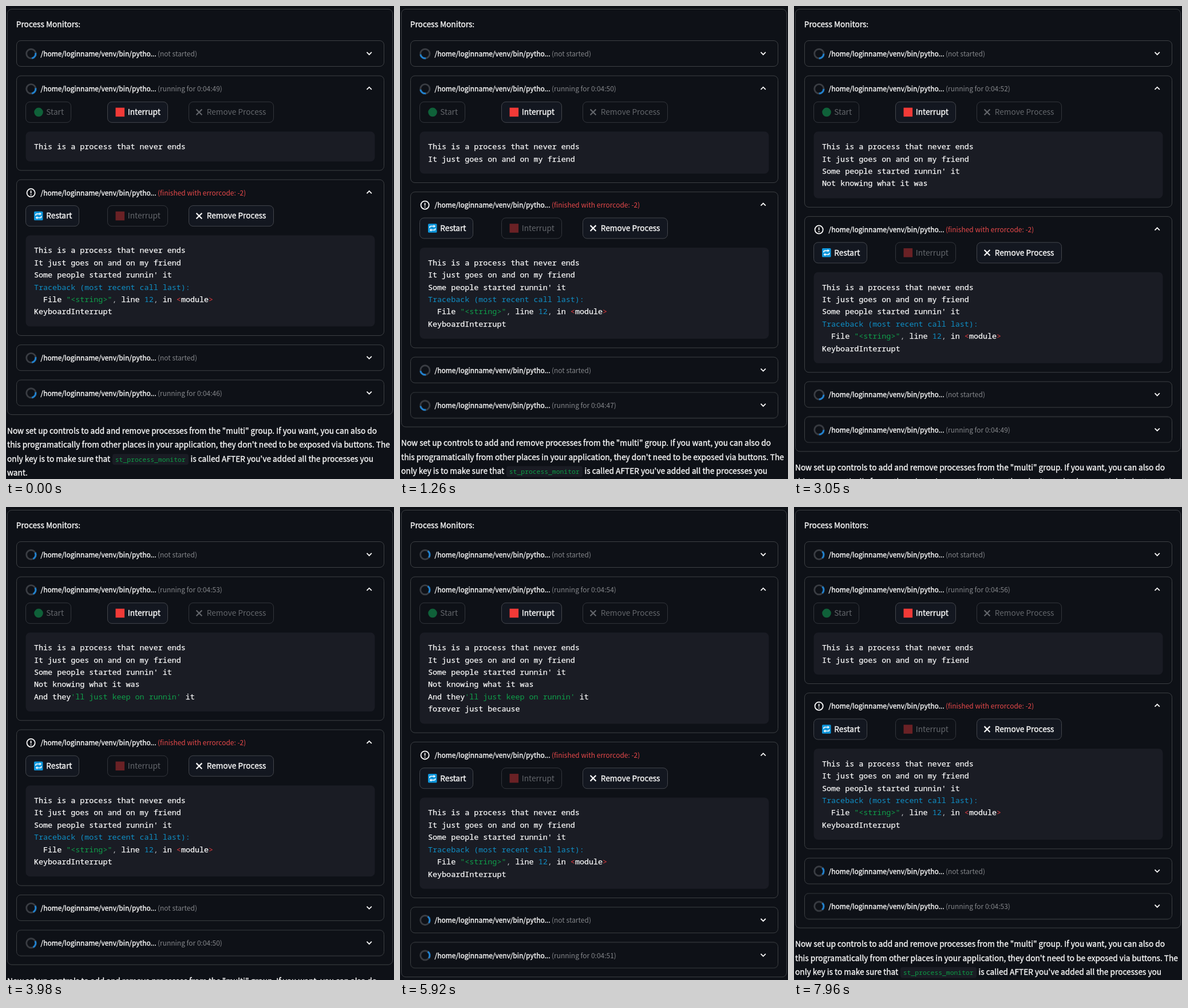
Write an HTML page that moves like this. It is 678 px wide and 826 px high and loops after 8 s.

```html
<!DOCTYPE html>
<html lang="en">
<head>
<meta charset="utf-8">
<title>Process Monitors</title>
<style>
  html, body { margin: 0; width: 100%; height: 100%; overflow: hidden; background: #0e1117; }
  svg { display: block; }
  text {
    font-family: "Noto Sans CJK JP", "Noto Sans CJK SC", "Open Sans", sans-serif;
    font-size: 13.68px; fill: #fafafa; stroke: #fafafa; stroke-width: .35px; white-space: pre;
  }
  .label { font-size: 11.97px; }
  .note { fill: #84868a; stroke: none; }
  .failed { fill: #e8494a; stroke: none; }
  .off { fill: #63666b; stroke: none; }
  .code, .tag { font-family: "Noto Sans Mono", "DejaVu Sans Mono", monospace; }
  .code { font-size: 13.38px; stroke-width: .25px; }
  .tag { font-size: 11.39px; fill: #0c9f46; stroke: none; }
  .blue { fill: #0f8fc6; stroke: none; }
  .green { fill: #0fa04a; stroke: none; }
  .red { fill: #e5393e; stroke: none; }
  .dim { fill: #b4b6b9; stroke: none; }
  .frame { fill: none; stroke: #3d4044; }
  .block { fill: #1a1c24; }
  .line { fill: none; stroke: #fafafa; stroke-width: 1.8; }
  .ring, .arc { fill: none; stroke-width: 2.9; }
  .ring { stroke: #3a3d43; }
  .arc { stroke: #1f86d8; stroke-dasharray: 1 3; animation: spin 8s linear infinite; }
  /* 8 s at one turn per 1.007 s */
  @keyframes spin { from { transform: rotate(-10deg); } to { transform: rotate(2850deg); } }
</style>
</head>
<body>
<svg id="stage" width="678" height="826" viewBox="0 0 678 826"></svg>
<script>
const LINE = 21.42, LOOP = 8000, FIRST_TICK = 955, TICK = 1007;
const stage = document.getElementById('stage');

const at = (y, body) => `<g transform="translate(0 ${y})">${body}</g>`;
const moving = (y, body) => `<g data-y="${y}">${body}</g>`;
const text = (x, y, body, cls = '') => `<text x="${x}" y="${y}" class="${cls}">${body}</text>`;
const span = (cls, body) => `<tspan class="${cls}">${body}</tspan>`;
const box = (x, y, w, h, cls, extra = '') =>
  `<rect x="${x}" y="${y}" width="${w}" height="${h}" rx="7.5" class="${cls}" ${extra}/>`;

const spinner = `<g transform="translate(43.8 22.8)"><circle r="8.1" class="ring"/>
  <circle r="8.1" class="arc" pathLength="4"/></g>`;
const alertIcon = `<circle cx="43.6" cy="23" r="7.1" class="line"/>
  <path class="line" d="M43.6 19v5M43.6 25.5v1.9"/>`;

function heading(note, { open = false, failed = false, id = '' } = {}) {
  const chevron = open ? 'M630.5 24l4.2-4.2 4.2 4.2' : 'M630.5 20.2l4.2 4.2 4.2-4.2';
  return (failed ? alertIcon : spinner)
    + text(60.5, 27.5, '/home/loginname/venv/bin/pytho...', 'label')
    + `<text x="265" y="27.5" class="label ${failed ? 'failed' : 'note'}" id="${id}">${note}</text>`
    + `<path class="line" d="${chevron}"/>`;
}

const icons = {
  start: () => '<circle cx="57" cy="18" r="7.8" fill="#0f6139"/>',
  stop: off => `<rect x="191.5" y="10.2" width="15.6" height="15.6" fill="${off ? '#6a2125' : '#f23a37'}"/>`,
  cross: off => `<path d="M332.6 13.1l9.8 9.8m0-9.8l-9.8 9.8" stroke-width="2.2" stroke="${off ? '#63666b' : '#fafafa'}"/>`,
  loop: () => `<rect x="49" y="10.2" width="15.5" height="15.5" rx="1.5" fill="#0f97dc"/>
    <path d="M52 17.5v-1.2q0-1.8 1.8-1.8h6M61.6 18.2v1.2q0 1.8-1.8 1.8h-6" fill="none" stroke="#fff" stroke-width="1.6"/>
    <path d="M58.7 12l3.4 2.5-3.4 2.5zM54.9 18.7l-3.4 2.5 3.4 2.5z" fill="#fff"/>`,
};

function button(x, w, icon, label, labelX, off) {
  return `<rect x="${x}" y="0" width="${w}" height="36" rx="7.5"
      fill="${off ? 'none' : '#131720'}" stroke="${off ? '#33363c' : '#43464c'}"/>`
    + icons[icon](off) + text(labelX, 22.9, label, off ? 'off' : '');
}

const buttons = running =>
  (running ? button(34.5, 79, 'start', 'Start', 70.3, true)
           : button(34.5, 93, 'loop', 'Restart', 70.3, false))
  + button(177.5, 105, 'stop', 'Interrupt', 212.7, !running)
  + button(319.5, 148, 'cross', 'Remove Process', 350.7, running);

const song = [
  'This is a process that never ends',
  'It just goes on and on my friend',
  "Some people started runnin' it",
  'Not knowing what it was',
  'And they' + span('green', "'ll just keep on runnin'") + ' it',
  'forever just because',
];
const traceback = [
  ...song.slice(0, 3),
  span('blue', 'Traceback (most recent call last):'),
  '  File ' + span('green', '"&lt;string&gt;"') + span('dim', ',') + ' line ' + span('blue', '12')
    + span('dim', ',') + ' in ' + span('red', '&lt;') + 'module' + span('red', '&gt;'),
  'KeyboardInterrupt',
];
const paragraph = [
  text(2, 0, 'Now set up controls to add and remove processes from the "multi" group. If you want, you can also do'),
  text(2, 0, "this programatically from other places in your application, they don't need to be exposed via buttons. The"),
  text(2, 0, 'only key is to make sure that')
    + '<rect x="186" y="-13.7" width="133" height="19" rx="4" class="block"/>'
    + text(190.8, 0, 'st_process_monitor', 'tag')
    + text(322.5, 0, "is called AFTER you've added all the processes you"),
  text(2, 0, 'want.'),
];

const closedRow = (note, id) => box(18.5, 0, 642, 45, 'frame') + heading(note, { id });

stage.innerHTML =
  box(2.5, 5.5, 673, 0, 'frame', 'data-bottom="713.6"')
  + text(17.8, 37, 'Process Monitors:')
  + at(60.5, closedRow('(not started)', ''))
  + box(18.5, 121.9, 642, 0, 'frame', 'data-bottom="287.1"')
  + at(121.9, heading('', { open: true, id: 'upper' }))
  + at(167.4, buttons(true))
  + box(34.5, 219.3, 610, 0, 'block', 'data-bottom="271.4"')
  + song.map((s, i) => `<g class="verse">${text(49, 250.2 + LINE * i, s, 'code')}</g>`).join('')
  + moving(303.3, box(18.5, 0, 642, 272.2, 'frame')
      + heading('(finished with errorcode: -2)', { open: true, failed: true }))
  + moving(348.6, buttons(false))
  + moving(400.5, box(34.5, 0, 610, 159.1, 'block'))
  + traceback.map((s, i) => moving(431.3 + LINE * i, text(49, 0, s, 'code'))).join('')
  + moving(591.7, closedRow('(not started)', ''))
  + moving(653.1, closedRow('', 'lower'))
  + paragraph.map((s, i) => moving(746.9 + 24.48 * i, s)).join('');

const all = selector => [...stage.querySelectorAll(selector)];
const movers = all('[data-y]'), growers = all('[data-bottom]'), verses = all('.verse');
const upper = document.getElementById('upper'), lower = document.getElementById('lower');

function show(tick) {
  const last = tick % song.length, shift = LINE * last;
  for (const g of movers)
    g.setAttribute('transform', `translate(0 ${+g.dataset.y + shift})`);
  for (const r of growers)
    r.setAttribute('height', +r.dataset.bottom + shift - r.getAttribute('y'));
  verses.forEach((v, i) => v.setAttribute('visibility', i <= last ? 'visible' : 'hidden'));
  upper.textContent = `(running for 0:04:${49 + tick})`;
  lower.textContent = `(running for 0:04:${46 + tick})`;
}

let begin, shown = 0;
function frame(now) {
  begin ??= now;
  const t = (now - begin) % LOOP;
  const tick = Math.max(0, Math.floor((t - FIRST_TICK) / TICK) + 1);
  if (tick !== shown) show(shown = tick);
  requestAnimationFrame(frame);
}
show(0);
requestAnimationFrame(frame);
</script>
</body>
</html>
```
